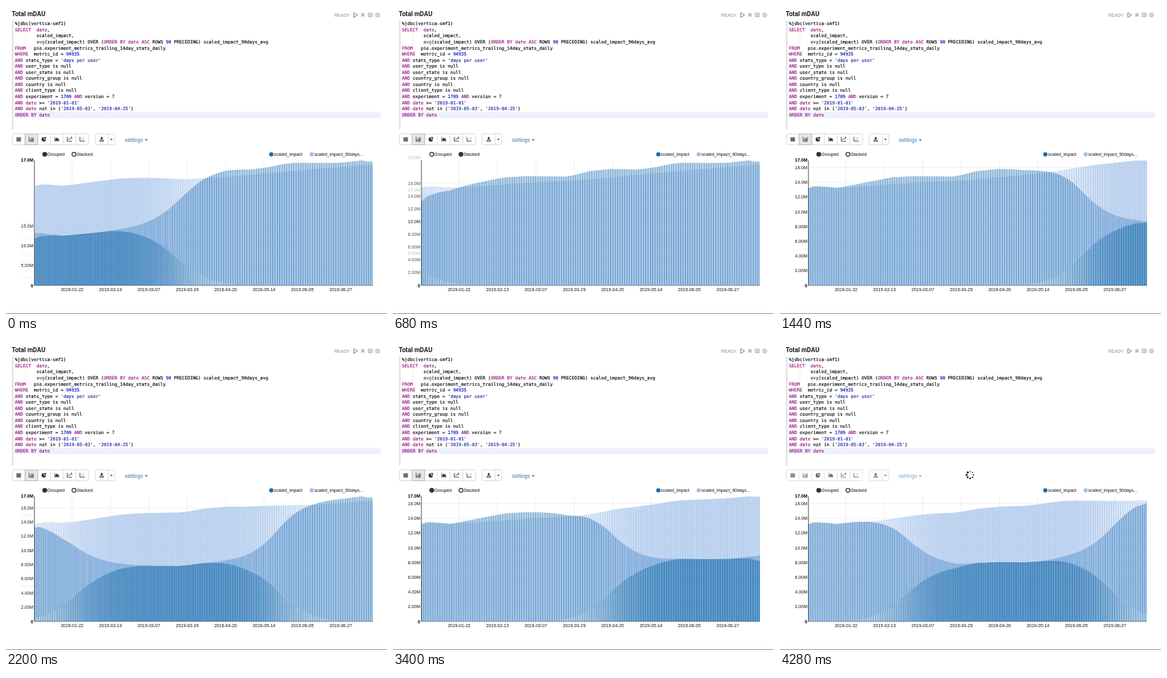
Recreate the animation shown at these times as an HTML page with a canvas. Size 600 px wide and 485 px high, loop 4320 ms.

```html
<!DOCTYPE html>
<html lang="en">
<head>
<meta charset="utf-8">
<title>Total mDAU</title>
<style>
  html, body { margin: 0; width: 600px; height: 485px; overflow: hidden; background: #fff; }
  #stage { position: relative; width: 600px; height: 485px; overflow: hidden; }
  canvas, svg { position: absolute; left: 0; top: 0; width: 600px; height: 485px; }
  canvas { filter: blur(.35px); }
  svg text { font: 7px "Liberation Sans", Arial, sans-serif; fill: #111; }
  svg .title { font: bold 10px Roboto, sans-serif; fill: #212121; }
  svg .bold { font-weight: bold; fill: #000; }
  svg .end { text-anchor: end; }
  svg .mid { text-anchor: middle; }
  svg .link { font-size: 8.4px; fill: #337ab7; }
  svg .ready { fill: #8c8c8c; }
  #code {
    position: absolute; left: 14px; top: 23.4px; margin: 0; color: #000;
    font: 7.05px/9.55px "DejaVu Sans Mono", monospace; white-space: pre;
    -webkit-text-stroke: .15px;
  }
  #code .k { color: #930f80; }
  #code .f { color: #3c4c72; }
  #code .n { color: #0000cd; }
  #code .s { color: #1a1aa6; }
  .line { fill: none; stroke: #999; stroke-width: .8; }
  .btn { fill: #fff; stroke: #ccc; stroke-width: .8; }
  .ink { fill: #333; }
  .pen { fill: none; stroke: #333; stroke-width: .9; }
</style>
</head>
<body>
<div id="stage">
  <canvas id="plot" width="600" height="485"></canvas>
  <svg viewBox="0 0 600 485">
    <defs><clipPath id="clip"><rect y="228" width="600" height="230"/></clipPath></defs>
    <text class="title" x="9" y="16">Total mDAU</text>
    <text class="ready" x="517" y="17">READY</text>
    <path d="M547.8 10.6L553.6 14.2L547.8 17.8Z" fill="none" stroke="#3071a9" stroke-width=".9"/>
    <path class="line" d="M559 11l2.2 2.2M565 11l-2.2 2.2M559 17l2.2-2.2M565 17l-2.2-2.2M561.4 11.6v1.8h-1.8M562.6 11.6v1.8h1.8M561.4 16.4v-1.8h-1.8M562.6 16.4v-1.8h1.8"/>
    <path class="line" d="M570.3 11.2h6.6v5.6h-6.6ZM573.6 11.2v6.2M571.2 13h1.5M574.5 13h1.5M571.2 15h1.5M574.5 15h1.5"/>
    <circle class="line" cx="585.3" cy="14.2" r="1"/>
    <circle class="line" cx="585.3" cy="14.2" r="2.8"/>
    <circle class="line" cx="585.3" cy="14.2" r="3.5" stroke-dasharray="1.2 1.55"/>

    <rect x="9.6" y="23" width="2" height="172" fill="#dcdcdc"/>
    <rect x="14" y="166.8" width="576" height="9.4" fill="#eef1fa"/>
    <path d="M31.3 42v20" stroke="#ddd" stroke-width=".6"/>

    <g id="tools">
      <rect class="btn" x="10" y="201.4" width="120" height="17" rx="2"/>
      <rect id="active" x="30" y="201.4" width="20" height="17" fill="#e6e6e6" stroke="#adadad" stroke-width=".8"/>
      <path class="btn" d="M30 201.4v17M50 201.4v17M70 201.4v17M90 201.4v17M110 201.4v17"/>
      <path class="pen" d="M17 207.2h6v5.6h-6ZM17 209.2h6M17 211h6M19 207.2v5.6M21 207.2v5.6"/>
      <path class="pen" d="M36.4 206v7h7.6M38.4 212v-2M40 212v-4.6M41.5 212v-3.4M43 212v-5.4"/>
      <path class="ink" d="M59.5 206.6a3.4 3.4 0 1 0 3.4 3.4h-3.4ZM60.4 205.9v3.2h3.2a3.2 3.2 0 0 0-3.2-3.2Z"/>
      <path class="ink" d="M76.4 206v7h7.6v-.8h-6.8V206ZM77.6 211.7v-2l1.8-2.5 1.8 1.6 1.2-1 1.2 3.9Z"/>
      <path class="pen" d="M96.4 206v7h7.6M97.6 211l1.8-2 1.4 1.2 2.8-3.4M102 206.6h1.8v1.8"/>
      <path class="pen" d="M116.4 206v7h7.6M118 211.2h1M119.6 208.8h1M121.2 210.6h1M122.4 207.2h1"/>
      <rect class="btn" x="140.3" y="201.4" width="31" height="17" rx="2"/>
      <path class="btn" d="M161 201.4v17"/>
      <path class="ink" d="M149.8 206h1.8v2.6h1.9l-2.8 2.7-2.8-2.7h1.9ZM147.4 211.2h1.6l1.7 1.2 1.7-1.2h1.6v2.1h-6.6Z"/>
      <path class="ink" d="M164 209.2h4l-2 2.2Z"/>
    </g>
    <g id="link">
      <text class="link" x="187" y="213.6">settings</text>
      <path d="M218.4 209.8h5l-2.5 2.7Z" fill="#337ab7"/>
    </g>
    <g id="spinner"></g>

    <g id="radios"></g>
    <text x="65" y="236">Grouped</text>
    <text x="111" y="236">Stacked</text>
    <circle cx="417.8" cy="233.6" r="3.4" fill="#1b6db1"/>
    <text x="422" y="236">scaled_impact</text>
    <circle cx="481.4" cy="233.6" r="3.4" fill="#a2c1ea"/>
    <text x="485.6" y="236">scaled_impact_90days...</text>
    <g id="labels" clip-path="url(#clip)"></g>
    <rect y="484" width="600" height="1" fill="#8e8e8e"/>
  </svg>
  <pre id="code"></pre>
</div>
<script>
const LOOP = 4320, STEP = 40;
const SWEEP = 427, BAR = SWEEP / 2;      // stagger across the chart, time per bar
const LEFT = 45, WIDTH = 533, TOP = 243, BASE = 440, COUNT = 194;
const MAX = [17, 33.3];                  // grouped, stacked (millions)
const UNIT = MAX.map(m => (BASE - TOP) / m);
const DARK = "rgba(27,109,177,.83)", LIGHT = "rgba(162,193,234,.78)";

// [time, mode]: 1 = stacked, 0 = grouped
const clicks = [
  [-284, 1], [-50, 0], [593, 1], [987, 0], [1788, 1],
  [2043, 0], [2809, 1], [3054, 0], [3793, 1], [4049, 0]
];

// curve knots as [x, height above the base in the grouped scale]
const impact = [
  [45, 153], [54, 156.5], [72, 155.5], [90, 153.5], [104, 156], [135, 162], [165, 168], [180, 170.5],
  [210, 172], [273, 171.5], [285, 173.5], [310, 180], [345, 183.5], [385, 182.5], [410, 185.5],
  [440, 191.5], [455, 193.2], [500, 192.8], [528, 193.2], [562, 197], [568, 195.3], [578, 195]
];
const average = [
  [45, 153.5], [60, 155.5], [90, 154.2], [104, 154.5], [165, 158.5], [225, 162.5], [285, 165],
  [345, 170.5], [405, 176], [465, 181.5], [525, 186.5], [578, 190.5]
];

const $ = id => document.getElementById(id);
const mix = (a, b, t) => a + (b - a) * t;
const clamp = t => Math.max(0, Math.min(1, t));
const ease = t => t < .5 ? 4 * t ** 3 : 1 - 4 * (1 - t) ** 3;

function curve(knots, x) {
  let i = 1;
  while (i < knots.length - 1 && knots[i][0] < x) i++;
  const [a, b] = [knots[i - 1], knots[i]];
  return mix(a[1], b[1], clamp((x - a[0]) / (b[0] - a[0])));
}

// how far a bar at position p (0..1) is towards the stacked layout
function stackAt(p, time) {
  let m = 0;
  for (const [at, mode] of clicks) {
    const t = (time - at - p * SWEEP) / BAR;
    if (t <= 0) break;
    m = mix(m, mode, ease(clamp(t)));
  }
  return m;
}

function add(parent, tag, attrs, text) {
  const el = document.createElementNS("http://www.w3.org/2000/svg", tag);
  for (const k in attrs) el.setAttribute(k, attrs[k]);
  if (text) el.textContent = text;
  return parent.appendChild(el);
}

const slot = WIDTH / COUNT, band = slot * .92;
const bars = Array.from({ length: COUNT }, (_, i) => {
  const x = LEFT + i * slot;
  return {
    x: x + (slot - band) / 2, p: i / COUNT,
    a: curve(impact, x + slot / 2) / UNIT[0],
    b: curve(average, x + slot / 2) / UNIT[0]
  };
});

// axis labels
const millions = v => v.toFixed(v < 10 ? 2 : 1) + "M";
const dates = ["2019-01-22", "2019-02-13", "2019-03-07", "2019-03-29", "2019-04-20", "2019-05-14", "2019-06-05", "2019-06-27"];
const tickX = i => LEFT + (21.5 + 22 * i) * slot;
dates.forEach((d, i) => add($("labels"), "text", { class: "mid", x: tickX(i), y: 449.4 }, d));
add($("labels"), "text", { class: "bold end", x: 43, y: 442.5 }, "0");
const maxLabel = add($("labels"), "text", { class: "bold end", x: 43 });
const ticks = [2, 4, 6, 8, 10, 12, 14, 16, 5, 15, 20, 25, 30].map(v => ({
  v, grouped: v % 2 === 0 && v < 17, stacked: v % 5 === 0,
  el: add($("labels"), "text", { class: "end", x: 43 }, millions(v))
}));

const radios = [61, 107].map(cx => add($("radios"), "circle", { cx, cy: 233.6, r: 3.1, stroke: "#333", "stroke-width": 1.3 }));

for (let i = 0; i < 8; i++) {
  const a = i * Math.PI / 4;
  add($("spinner"), "circle", { cx: 5.4 * Math.cos(a), cy: 5.4 * Math.sin(a), r: .8 + i * .13, fill: "#111" });
}

// query text with highlighting
const query = `%jdbc(vertica-smf1)
SELECT  date,
        scaled_impact,
        avg(scaled_impact) OVER (ORDER BY date ASC ROWS 90 PRECEDING) scaled_impact_90days_avg
FROM   pie.experiment_metrics_trailing_14day_stats_daily
WHERE  metric_id = 94935
AND stats_type = 'days per user'
AND user_type is null
AND user_state is null
AND country_group is null
AND country is null
AND client_type is null
AND experiment = 1709 AND version = 7
AND date >= '2019-01-01'
AND date not in ('2019-05-03', '2019-04-25')
ORDER BY date`;
const token = /('[^']*')|\b(SELECT|FROM|WHERE|AND|ORDER|BY|ASC|date)\b|\b(avg)\b|\b(\d+)\b/g;
$("code").innerHTML = query.replace(token, (all, ...g) =>
  `<span class="${"skfn"[g.findIndex(Boolean)]}">${all}</span>`);

const ctx = $("plot").getContext("2d");

function box(color, x, y, w, h) {
  ctx.fillStyle = color;
  ctx.fillRect(x, y, w, h);
}

function drawAxis(time, mode) {
  const m = stackAt(0, time), unit = mix(...UNIT, m);
  dates.forEach((_, i) => box("#ececec", tickX(i) - .5, TOP, 1, BASE - TOP));
  for (const { v, grouped, stacked, el } of ticks) {
    const y = BASE - v * unit;
    const hidden = !mode && v > MAX[0];
    const alpha = hidden ? 0 : (grouped ? 1 - m : 0) + (stacked ? m : 0);
    el.setAttribute("y", y + 2.5);
    el.setAttribute("opacity", alpha);
    if (y < TOP) continue;
    ctx.globalAlpha = alpha;
    box("#efefef", LEFT, y - .5, WIDTH, 1);
    ctx.globalAlpha = 1;
  }
  maxLabel.textContent = millions(MAX[mode]);
  maxLabel.setAttribute("y", (mode ? BASE - MAX[1] * unit : TOP) + 2);
  box("#444", LEFT - .7, TOP, 1, BASE - TOP);
  box("#555", LEFT, BASE - .4, WIDTH, .8);
}

function drawBars(time) {
  const state = bars.map(b => stackAt(b.p, time));
  bars.forEach(({ x, a }, i) => {
    const h = a * mix(...UNIT, state[i]);
    box(DARK, x, BASE - h, band * mix(.5, 1, state[i]), h);
  });
  bars.forEach(({ x, a, b }, i) => {
    const m = state[i], h = b * mix(...UNIT, m);
    const foot = BASE - a * UNIT[1] * m;
    box(LIGHT, x + band * mix(.5, 0, m), foot - h, band * mix(.5, 1, m), h);
  });
}

function drawTools(time) {
  const busy = clamp((time - 3900) / 300);
  $("active").setAttribute("opacity", 1 - busy);
  $("tools").setAttribute("opacity", 1 - busy * .25);
  $("link").setAttribute("opacity", 1 - busy * .35);
  $("spinner").setAttribute("opacity", busy);
  $("spinner").setAttribute("transform", `translate(299.3 209.3) rotate(${(time - 4280) * .18 - 90})`);
}

function frame() {
  const time = Math.floor(performance.now() % LOOP / STEP) * STEP;
  const mode = clicks.filter(c => c[0] <= time).pop()[1];
  ctx.clearRect(0, 0, 600, 485);
  drawAxis(time, mode);
  drawBars(time);
  drawTools(time);
  radios.forEach((r, i) => r.setAttribute("fill", i === mode ? "#333" : "#fff"));
  requestAnimationFrame(frame);
}
frame();
</script>
</body>
</html>
```
